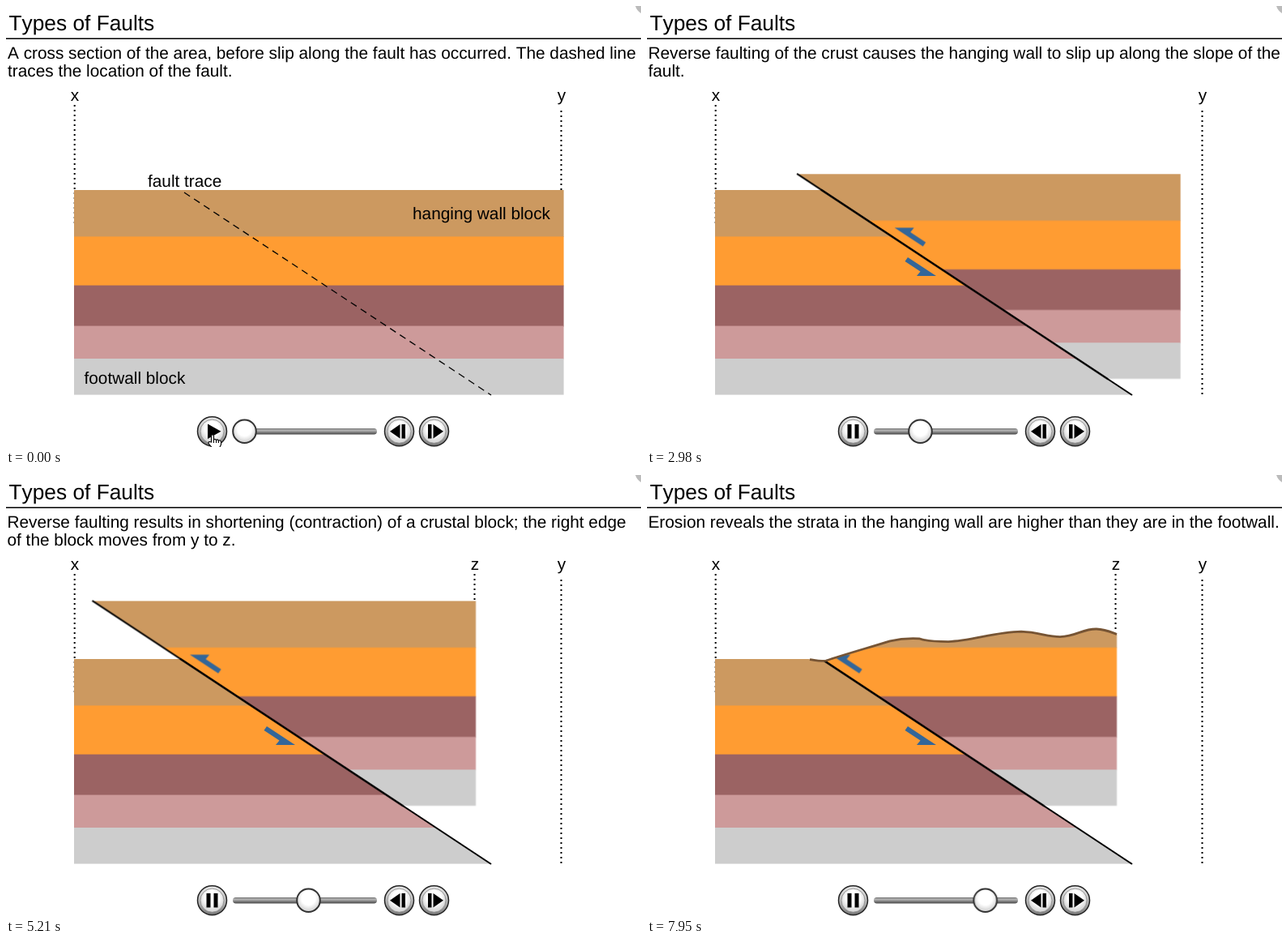
Recreate the animation shown at these times as an HTML page. Size 784 by 544 pixels, loop 8000 ms.

```html
<!DOCTYPE html>
<html lang="en">
<head>
<meta charset="utf-8">
<title>Types of Faults</title>
<style>
html, body { margin: 0; width: 100%; height: 100%; overflow: hidden; background: #fff; }
svg { display: block; width: 784px; height: 544px; }
text { font: 20.8px "Liberation Sans", Arial, sans-serif; font-kerning: none; text-rendering: geometricPrecision; }
.title { font-size: 26.3px; }
.mid { text-anchor: middle; }
.dots { fill: none; stroke: #000; stroke-width: 2; stroke-dasharray: 2 4; }
.fault { stroke: #000; stroke-width: 2; }

.intro, .press, .slip, .result, .worn, .solid, .zmark, .block, .knob, .sky, .ground, .zdots {
  animation: 8s step-end -3ms infinite;
}
.intro { animation-name: intro; }
.press { animation-name: press; }
.slip { animation-name: slip; }
.result { animation-name: result; }
.worn { animation-name: worn; }
.solid { animation-name: solid; }
.zmark { animation-name: zmark; }
.block { animation-name: block; }
.knob { animation-name: knob; }
.sky { animation-name: sky; }
.ground { animation-name: ground; }
.zdots { animation-name: zdots; }

@keyframes intro { 0% { visibility: visible } 4%, 100% { visibility: hidden } }
@keyframes press { 0% { visibility: hidden } .75% { visibility: visible } 4%, 100% { visibility: hidden } }
@keyframes solid { 0% { visibility: hidden } 4%, 100% { visibility: visible } }
@keyframes slip { 0% { visibility: hidden } 4% { visibility: visible } 61.375%, 100% { visibility: hidden } }
@keyframes result { 0% { visibility: hidden } 61.375% { visibility: visible } 87.375%, 100% { visibility: hidden } }
@keyframes zmark { 0% { visibility: hidden } 61.375%, 100% { visibility: visible } }
@keyframes worn { 0% { visibility: hidden } 87.375%, 100% { visibility: visible } }

@keyframes knob {
  0% { transform: translateX(0) }
  4% { transform: translateX(0); animation-timing-function: steps(28) }
  25% { transform: translateX(27.1px); animation-timing-function: steps(3) }
  29% { transform: translateX(32.3px); animation-timing-function: steps(11) }
  37.25% { transform: translateX(43px); animation-timing-function: steps(12) }
  46.375% { transform: translateX(54.7px); animation-timing-function: steps(41) }
  77.125% { transform: translateX(94.5px) }
  78.75% { transform: translateX(96.6px); animation-timing-function: steps(14) }
  89.375% { transform: translateX(110.3px); animation-timing-function: steps(11) }
  99.375%, 100% { transform: translateX(123.2px) }
}
@keyframes block {
  0% { transform: translate(0, 0) }
  29% { transform: translate(-2.6px, -1.7px); animation-timing-function: steps(11) }
  37.25% { transform: translate(-29.9px, -19.7px); animation-timing-function: steps(12) }
  46.375% { transform: translate(-59.4px, -39.2px); animation-timing-function: steps(20) }
  61.375%, 100% { transform: translate(-108.5px, -71.6px) }
}
@keyframes sky {
  0% { d: var(--sky0); visibility: hidden }
  87.875% { d: var(--sky0); visibility: visible; animation-timing-function: steps(14) }
  99.375%, 100% { d: var(--sky1); visibility: visible }
}
@keyframes ground {
  0% { d: var(--ground0); visibility: hidden }
  87.875% { d: var(--ground0); visibility: visible; animation-timing-function: steps(14) }
  99.375%, 100% { d: var(--ground1); visibility: visible }
}
@keyframes zdots {
  0% { d: path("M578.5 122V155") }
  87.875% { d: path("M578.5 122V155"); animation-timing-function: steps(14) }
  99.375%, 100% { d: path("M578.5 122V191") }
}
</style>
</head>
<body>
<svg viewBox="0 0 784 544">
  <defs>
    <g id="strata">
      <rect x="84" y="227" width="604.6" height="58" fill="#cc9960"/>
      <rect x="84" y="284.4" width="604.6" height="61" fill="#ff9c32"/>
      <rect x="84" y="344.6" width="604.6" height="51" fill="#9b6363"/>
      <rect x="84" y="394.6" width="604.6" height="41" fill="#cd9a9a"/>
      <rect x="84" y="435" width="604.6" height="44.6" fill="#cdcdcd"/>
    </g>
    <clipPath id="foot"><path d="M84 220H205.6L600 480H84Z"/></clipPath>
    <clipPath id="hang"><path d="M700 220H204.8L599 480H700Z"/></clipPath>
    <linearGradient id="rim" x2="0" y2="1">
      <stop offset="0" stop-color="#e8e8e8"/><stop offset=".5" stop-color="#bdbdbd"/><stop offset="1" stop-color="#777"/>
    </linearGradient>
    <radialGradient id="face" cy=".4">
      <stop offset=".6" stop-color="#fff"/><stop offset="1" stop-color="#dcdcdc"/>
    </radialGradient>
    <linearGradient id="bar" x2="0" y2="1">
      <stop offset="0" stop-color="#777"/><stop offset=".35" stop-color="#b4b4b4"/><stop offset="1" stop-color="#444"/>
    </linearGradient>
    <g id="button">
      <circle r="18" fill="url(#rim)" stroke="#222" stroke-width="1.5"/>
      <circle r="14.5" fill="url(#face)" stroke="#888" stroke-width=".8"/>
    </g>
    <path id="arrow" d="M333 291.5H357L352.5 297L371.5 309.5L368 314.5Z" fill="#336699"/>
  </defs>

  <path d="M777 0Q779 6 784 9V0Z" fill="#bbb"/>
  <text class="title" x="3.5" y="30">Types of Faults</text>
  <rect y="39.5" width="784" height="1.5"/>

  <g class="intro">
    <text x="2" y="65">A cross section of the area, before slip along the fault has occurred. The dashed line</text>
    <text x="2" y="87">traces the location of the fault.</text>
  </g>
  <g class="slip">
    <text x="1.5" y="65">Reverse faulting of the crust causes the hanging wall to slip up along the slope of the</text>
    <text x="1.5" y="87">fault.</text>
  </g>
  <g class="result">
    <text x="1.5" y="65">Reverse faulting results in shortening (contraction) of a crustal block; the right edge</text>
    <text x="1.5" y="87">of the block moves from y to z.</text>
  </g>
  <text class="worn" x="1.5" y="65">Erosion reveals the strata in the hanging wall are higher than they are in the footwall.</text>

  <text class="mid" x="85" y="117">x</text>
  <text class="mid" x="686" y="116.5">y</text>
  <path class="dots" d="M84.7 122V270"/>
  <path class="dots" d="M685.5 129V480"/>

  <use href="#strata" clip-path="url(#foot)"/>
  <g class="block">
    <use href="#strata" clip-path="url(#hang)"/>
    <g class="solid">
      <path class="fault" d="M215 226.7L599 480"/>
      <use href="#arrow" x="2.6" y="1.7"/>
    </g>
  </g>
  <g class="solid">
    <path class="fault" d="M215 226.7L599 480"/>
    <use href="#arrow" transform="rotate(180 345 312.25)"/>
  </g>
  <path class="sky" fill="#fff"/>
  <path class="ground" fill="none" stroke="#765434" stroke-width="2.8"/>

  <g class="zmark">
    <text class="mid" x="579" y="117">z</text>
    <path class="dots zdots" d="M578.5 122V155"/>
  </g>

  <g class="intro">
    <path d="M220 230L599 480" stroke="#000" stroke-width="1.3" stroke-dasharray="8.5 6"/>
    <text x="175" y="222.5">fault trace</text>
    <text x="502" y="263">hanging wall block</text>
    <text x="96.5" y="466">footwall block</text>
  </g>

  <rect x="280" y="521" width="178" height="7.5" rx="3.7" fill="url(#bar)"/>
  <g class="knob">
    <circle cx="294.5" cy="524.7" r="14.3" fill="url(#face)" stroke="#333" stroke-width="2"/>
  </g>

  <use href="#button" x="254.5" y="524.7"/>
  <use href="#button" x="485.5" y="524.7"/>
  <use href="#button" x="528.5" y="524.7"/>
  <path d="M474 524.7L486.500 516V533.500ZM488.500 516H493V533.500H488.500Z"/>
  <path d="M521 516H525.500V533.500H521ZM527.500 516L540 524.700L527.500 533.500Z"/>
  <path class="solid" d="M247.500 516H252.500V533.500H247.500ZM256.500 516H261.500V533.500H256.500Z"/>
  <circle class="press" cx="254.5" cy="524.7" r="18" opacity=".18"/>
  <g class="intro">
    <path d="M249 515.500L265.500 524.700L249 534Z"/>
    <path d="M253.500 538V530Q255 527.500 256.500 530V535Q258 533.500 259.500 535.500Q261 534 262.500 536Q264.500 535 265.500 537.500V541L263.500 545H254.500L250 539.500Q249.500 536.500 253.500 538Z" fill="#fff" stroke="#000" stroke-width="1.1"/>
    <path d="M256.500 535V539M259.500 535.500V539M262.500 536V539" stroke="#000"/>
  </g>
</svg>
<script>
// Eroded surface as cubic points; the flat surface spreads the same points along the block top.
const surface = [
  [201, 227.6], [208, 228.5], [214, 230.5], [221, 229],
  [240, 222.5], [270, 214], [300, 204.8],
  [312, 202], [322, 201], [336, 201.8],
  [342, 204], [354, 205.6], [372, 205.6],
  [400, 205], [430, 193.5], [462, 193.2],
  [484, 194], [494, 199.6], [510, 199.6],
  [530, 199], [538, 189.6], [555, 190],
  [566, 190.5], [572, 193.5], [580, 196.5]
];
const flat = surface.map(([x]) => [Math.max(107, 108 + (x - 221) * 472 / 359), 155.5]);
const curve = ([first, ...rest]) => `M${first}C${rest.join(' ')}`;
const root = document.documentElement.style;

[flat, surface].forEach((points, i) => {
  const line = curve(points);
  root.setProperty(`--ground${i}`, `path("${line}")`);
  root.setProperty(`--sky${i}`, `path("${line}H600V140H88V160Z")`);
});
</script>
</body>
</html>
```
